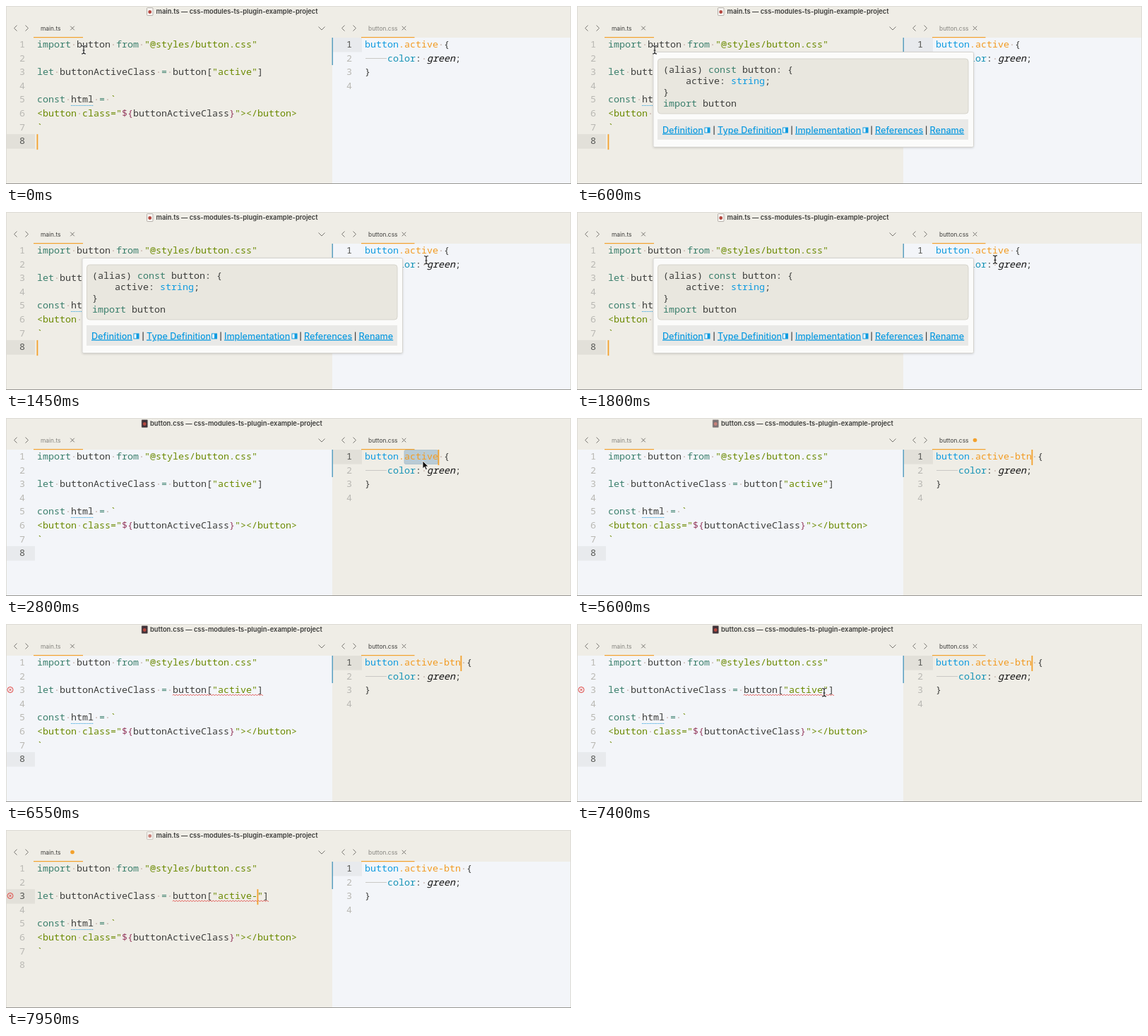
Write an HTML page that moves like this. It is 800 px wide and 253 px high and loops after 8000 ms.

```html
<!DOCTYPE html>
<html lang="en">
<head>
<meta charset="utf-8">
<style>
  html, body { margin: 0; width: 100%; height: 100%; overflow: hidden; background: #efede6; }
  svg { display: block; width: 800px; height: 253px; }
  text { white-space: pre; }
  .code { font: 500 13.33px "Noto Sans Mono", monospace; }
  .ui { font-family: Inter, sans-serif; }
  .k { fill: #3a7f6c } .s { fill: #6b8a00 } .d { fill: #3d3e3c } .b { fill: #0f9be0 }
  .o { fill: #f29b22 } .t { fill: #1593b6 } .m { fill: #953c60 } .g { fill: #c0a9a0 }
  .i { fill: #111; font-style: italic }
  .line { fill: none; stroke: #777570; stroke-width: 1; }
</style>
</head>
<body>
<svg id="stage" viewBox="0 0 800 253"></svg>
<script>
const LOOP = 8000, CHAR = 8, ROW = 19.6, LEFT = 44, RIGHT = 508;
const WARM = '#efede6', COOL = '#f3f5f9', ORANGE = '#f3a12c';
const stage = document.getElementById('stage');

// Times in ms
const POPUP = 350, HOVER_CSS = 1400, FOCUS_CSS = 1850, SELECT = 2150, SAVE = 6150, ERROR = 6500,
      FOCUS_TS = 7550, TS_KEY = 7800;
const KEYS = [[3000, 'a'], [3200, 'c'], [3380, 't'], [3540, 'i'], [3680, 'v'], [3820, 'e'],
              [4800, '-'], [5200, 'b'], [5360, 't'], [5500, 'n']];
const FIRST_KEY = KEYS[0][0];

// Pointer stops: time, x, y
const POINTER = [[0, 110, 62], [850, 110, 62], [1120, 300, 112], [1400, 595, 68], [1700, 595, 68],
                 [1850, 591, 67], [6900, 591, 67], [7350, 350, 97], [8000, 350, 97]];

const rect = (x, y, w, h, fill, more = '') =>
  `<rect x="${x}" y="${y}" width="${w}" height="${h}" fill="${fill}" ${more}/>`;
const path = (d, more = 'class="line"') => `<path d="${d}" ${more}/>`;
const cross = (x, y, r, more) => path(`M${x - r} ${y - r}l${2 * r} ${2 * r}m0 ${-2 * r}l${-2 * r} ${2 * r}`, more);
const circle = (x, y, r, more) => `<circle cx="${x}" cy="${y}" r="${r}" ${more}/>`;
const baseline = n => 59 + ROW * (n - 1);
const label = (x, y, size, fill, text, more = '') =>
  `<text class="ui" x="${x}" y="${y}" font-size="${size}" fill="${fill}" ${more}>${text}</text>`;

// Each token is "colour:text"
function code(x, y, tokens, dots = true) {
  const spans = tokens.map(token => {
    let text = token.slice(2).replace(/</g, '&lt;');
    if (dots) text = text.replace(/ /g, '<tspan class="g">·</tspan>');
    return `<tspan class="${token[0]}">${text}</tspan>`;
  });
  return `<text class="code" x="${x}" y="${y}">${spans.join('')}</text>`;
}

function gutter(right, count, active) {
  let out = '';
  for (let n = 1; n <= count; n++)
    out += `<text class="code" x="${right}" y="${baseline(n)}" text-anchor="end" fill="${n === active ? '#555653' : '#b9b8b3'}">${n}</text>`;
  return out;
}

const caret = (x, n) => rect(x - .5, baseline(n) - 14, 1.8, 22, ORANGE);

function tab(x, name, width, lit, dirty) {
  const markX = x + width - 15;
  return path(`M${x - 23.5} 27.5l-4 4l4 4m12 -8l4 4l-4 4`) +
    label(x + 10, 34.5, 8.4, lit ? '#3c3c3a' : '#85847f', name) +
    (dirty ? circle(markX, 31.5, 2.8, `fill="${ORANGE}"`) : cross(markX, 31.5, 2.8)) +
    rect(x, 44, width, 1.2, ORANGE);
}

function title(inCss, dirty) {
  const x = inCss ? 192 : 199.5;
  return `<g opacity="${dirty ? .65 : 1}">` +
    rect(x, 2.5, 8.5, 11, inCss ? '#40333a' : '#f8f6f2', 'rx="1" stroke="#8d8883" stroke-width=".6"') +
    circle(x + 4.2, 8.5, 2.4, 'fill="#b4473f"') + '</g>' +
    label(inCss ? 204 : 212.5, 11.2, 9.32, '#3b3b39',
      (inCss ? 'button.css' : 'main.ts') + ' — css-modules-ts-plugin-example-project', 'font-weight="600"');
}

function leftPane(focused, row, extra, error) {
  const lines = [
    ['k:import ', 'd:button ', 'k:from ', 's:"@styles/button.css"'], [],
    ['k:let ', 'd:buttonActiveClass ', 'k:= ', 'd:button[', `s:"active${extra}"`, 'd:]'], [],
    ['k:const ', 'd:html ', 'k:= ', 's:`'],
    ['s:<button class="', 'm:${', 'd:buttonActiveClass', 'm:}', 's:"></button>'],
    ['s:`']
  ];
  let out = rect(0, 45, 462, 208, focused ? WARM : COOL) +
    rect(0, baseline(row) - 14, 41, 20.5, focused ? '#e2e0d9' : '#e8eaed') + gutter(27, 8, row) +
    lines.map((tokens, i) => code(LEFT, baseline(i + 1), tokens)).join('') +
    path('M92 141.5h32', 'stroke="#3aa6df" stroke-dasharray="1.3 1"');
  if (error) {
    const start = LEFT + 24 * CHAR, waves = (16 + extra.length) * CHAR / 4;
    out += path(`M${start} 101.5` + 'q1 -2.4 2 -1t2 1'.repeat(waves), 'fill="none" stroke="#e0433f" stroke-width=".75"') +
      circle(6, 93.5, 4, 'fill="none" stroke="#e0433f"') + cross(6, 93.5, 1.6, 'stroke="#e0433f"');
  }
  if (focused) out += row === 8 ? caret(LEFT, 8) : caret(LEFT + (38 + extra.length) * CHAR, 3);
  return out;
}

function rightPane(focused, hovered, name, selected) {
  const start = RIGHT + 7 * CHAR, end = start + name.length * CHAR;
  const rowFill = focused ? '#e2e0d9' : hovered ? COOL : '#e8eaed';
  return rect(462, 45, 338, 208, focused ? WARM : COOL) +
    rect(463, 45, 41, 20.5, rowFill) + rect(461.5, 45, 1.5, 39, '#5a9fc0') +
    gutter(490, 4, 1) +
    (selected ? rect(start, 45.5, end - start, 20, '#b9cbd5', 'rx="2" stroke="#a3bbc9" stroke-width=".7"') : '') +
    code(RIGHT, baseline(1), ['b:button', 'o:.' + name, 'd: {']) +
    path('M509 74.5h30', 'stroke="#c9c8c5"') +
    code(RIGHT + 4 * CHAR, baseline(2), ['t:color', 'd:: ', 'i:green', 'd:;']) +
    code(RIGHT, baseline(3), ['d:}']) +
    (focused ? caret(end, 1) : '');
}

function popup() {
  const lines = [['d:(alias) ', 'k:const ', 'd:button: {'], ['d:    active: ', 'b:string', 'd:;'],
                 ['d:}'], ['k:import ', 'd:button']];
  const links = [[121, 'Definition', 181], [199, 'Type Definition', 291.5], [309, 'Implementation', 405],
                 [422, 'References'], [499.5, 'Rename']];
  return rect(108, 65.5, 453.5, 135, '#fbfbfa', 'rx="2" stroke="#d5d4d0" filter="url(#shadow)"') +
    rect(114.5, 75, 439.5, 78, '#e9e7df', 'rx="4" stroke="#d6d4cc"') +
    lines.map((tokens, i) => code(122, 94.5 + 16.2 * i, tokens, false)).join('') +
    rect(114, 161, 440, 29, '#e9e9e7') +
    links.map(([x, text, icon]) =>
      label(x, 180.5, 12.6, '#0f9be0', text, 'font-weight="500" text-decoration="underline"') +
      (icon ? rect(icon, 173, 7, 7, '#fff', 'stroke="#0f9be0"') + rect(icon + 3.5, 173, 3.5, 7, '#0f9be0') : '')).join('') +
    [193.5, 303.5, 416.5, 494].map(x => rect(x, 170.5, 1.2, 12.5, '#444')).join('');
}

function pointer(t) {
  if (t >= FIRST_KEY && t < 6900 || t >= TS_KEY) return '';
  const i = POINTER.findIndex((stop, n) => n && t <= stop[0]);
  const [t0, x0, y0] = POINTER[i - 1], [t1, x1, y1] = POINTER[i];
  const p = (t - t0) / (t1 - t0), ease = p * p * (3 - 2 * p);
  const at = `transform="translate(${(x0 + (x1 - x0) * ease).toFixed(1)} ${(y0 + (y1 - y0) * ease).toFixed(1)})"`;
  if (t >= SELECT && t < FIRST_KEY)
    return path('M-1 -6v11l2.6 -2.4l1.8 4l2 -.9l-1.8 -3.8h3.5z', `${at} fill="#111" stroke="#fff" stroke-width=".8"`);
  const beam = 'M-3 -5.5q3 0 3 2q0 -2 3 -2M0 -3.5v8M-3 6q3 0 3 -2q0 2 3 2M-1.5 1h3';
  return path(beam, `${at} fill="none" stroke="#fff" stroke-width="2.6"`) +
    path(beam, `${at} fill="none" stroke="#222" stroke-width="1.2"`);
}

function scene(t) {
  const inCss = t >= FOCUS_CSS && t < FOCUS_TS;
  const hovered = t >= HOVER_CSS && t < FOCUS_CSS;
  const cssDirty = t >= FIRST_KEY && t < SAVE, tsDirty = t >= TS_KEY;
  const name = t < FIRST_KEY ? 'active' : KEYS.filter(key => key[0] <= t).map(key => key[1]).join('');
  return '<defs><filter id="shadow" x="-5%" y="-10%" width="110%" height="125%"><feDropShadow dx="0" dy="1" stdDeviation="1.5" flood-opacity=".15"/></filter></defs>' +
    rect(0, 0, 800, 253, WARM) + title(inCss, cssDirty || tsDirty) +
    leftPane(!inCss, t < FOCUS_TS ? 8 : 3, tsDirty ? '-' : '', t >= ERROR) +
    rightPane(inCss, hovered, name, t >= SELECT && t < FIRST_KEY) +
    tab(39, 'main.ts', 70, !inCss, tsDirty) + tab(503, 'button.css', 75.5, inCss || hovered, cssDirty) +
    path('M442.5 29.5l4.5 4.5l4.5 -4.5') +
    (t >= POPUP && t < FOCUS_CSS ? popup() : '') +
    rect(0, 0, 800, 1, '#dddbd5') + rect(0, 0, 1, 253, '#dddbd5') + rect(799, 0, 1, 253, '#dddbd5') +
    rect(0, 252, 800, 1, '#989793') + pointer(t);
}

let shown = '';
function frame() {
  const markup = scene(performance.now() % LOOP);
  if (markup !== shown) stage.innerHTML = shown = markup;
  requestAnimationFrame(frame);
}
frame();
</script>
</body>
</html>
```
